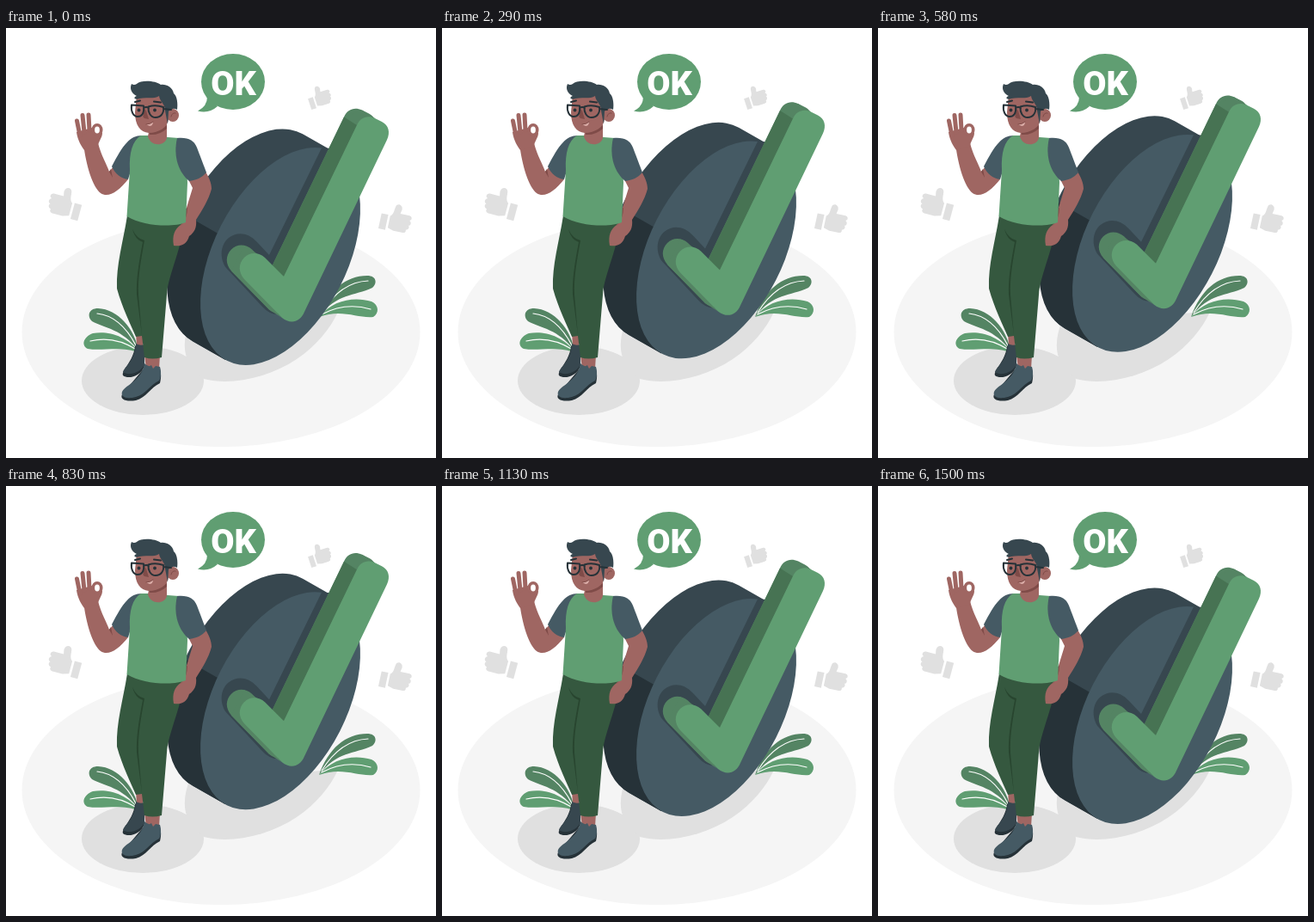
An HTML page for the animation above (1.54 s loop, 500 by 500 pixels).

```html
<!DOCTYPE html>
<html lang="en">
<head>
<meta charset="utf-8">
<style>
  html, body { margin: 0; width: 100%; height: 100%; overflow: hidden; background: #fff; }
  svg { display: block; width: 100vw; height: 100vh; }
  .green { fill: #609e72; }
  .leaf { fill: #548463; }
  .forest { fill: #477353; }
  .slate { fill: #455a64; }
  .dark { fill: #37474f; }
  .ink { fill: #263238; }
  .skin { fill: #9f6662; }
  .shade { fill: #7f4b48; }
  .pants { fill: #35583f; }
  .grey { fill: #e0e0e0; }
  .line { fill: none; stroke-linecap: round; stroke-linejoin: round; }
</style>
</head>
<body>
<svg viewBox="0 0 500 500">
  <defs>
    <g id="thumb" class="grey">
      <path d="M-17.5-4H-9.500V14H-17.500Z"/>
      <path d="M-7-3C-3-6-4-11-3-15C-2-20 5-19 5-13L4-8H14C19-8 19-3 16-2.500C19-1 19 3 16 3.500C18 5 17 8.500 14 9C15 12 13 13 10 13H0L-7 11Z"/>
    </g>
    <path id="check" d="M323 289L408 113C412 104 420 101 429 105L437 109C445 113 447 121 443 130L347 330C342 342 331 345 321 337L277 292C270 284 270 274 277 267C284 260 294 261 301 267Z"/>
  </defs>

  <ellipse cx="250" cy="353.500" rx="231.500" ry="133.500" fill="#f5f5f5"/>
  <ellipse class="grey" cx="159" cy="410" rx="71" ry="40"/>
  <path class="grey" d="M214 340C204 366 204 390 230 408C262 416 305 407 338 385C360 370 377 350 386 330Z"/>
  <use href="#thumb" transform="translate(69 205) rotate(15) scale(-1.07 1.07)"/>
  <use href="#thumb" transform="translate(453 223) rotate(12)"/>
  <use href="#thumb" transform="translate(364.500 81) rotate(-18) scale(.75)"/>

  <g id="bubble">
    <ellipse class="green" cx="264" cy="62.500" rx="37" ry="32.500"/>
    <path class="green" d="M234 80Q234 91 223 96.500Q236 100 246 91Z"/>
    <text x="264.500" y="77.500" text-anchor="middle" fill="#fff" font-family="Roboto, sans-serif" font-weight="900" font-size="39.500">OK</text>
  </g>

  <g id="plants">
    <path class="leaf" d="M154 375C150 350 130 327 107 326C96 326 94 335 100 341C115 349 135 350 154 375Z"/>
    <path class="green" d="M156 378C140 357 118 352 101 355C90 359 87 369 95 373C112 376 135 369 156 378Z"/>
    <path class="leaf" d="M364 336C375 305 395 288 420 288C431 288 432 297 426 302C405 312 385 308 364 336Z"/>
    <path class="green" d="M364 336C380 316 405 312 425 318C434 322 434 332 427 336C410 338 390 326 364 336Z"/>
    <path class="line" stroke="#fff" stroke-width="1.200" d="M106 332C126 334 141 350 151 369M98 364C118 359 136 364 152 374M421 294C398 295 380 310 367 331M424 327C404 321 384 324 367 333"/>
  </g>

  <g id="disc">
    <path class="dark" d="M382.800 144.900L345 123.400A77.700 136.400 27.100 0 0 217.400 364.600L255.200 386.100Z"/>
    <path class="ink" d="M250 241L207 216.500A77.700 136.400 27.100 0 0 217.400 364.600L255.200 386.100Z"/>
    <ellipse class="slate" cx="319" cy="265.500" rx="77.700" ry="136.400" transform="rotate(27.100 319 265.500)"/>
    <path class="dark" d="M367 139.500L306 264L292 249C281 237 268 237 259 244C249 252 248 268 256 279L298 324Q306 333 316 333L330 300L378 140Z"/>
    <use href="#check" class="leaf" x="-15" y="-9.500"/>
    <path class="leaf" d="M414 95.500L429 105L408 113L393 103.500ZM277 253L292 262.500L277 292L262 282.500ZM262 282.500L277 292L321 337L306 327.500Z"/>
    <path class="forest" d="M308 279.500L393 103.500L408 113L323 289Z"/>
    <use href="#check" class="green"/>
  </g>

  <g id="man">
    <!-- legs and shoes -->
    <path class="skin" d="M151 355L159 356V371L152 370ZM161 380L179 380L178 397L163 396Z"/>
    <path class="ink" d="M150 370L161 370V393C157 405 142 409 136 404C134 398 148 388 150 370Z"/>
    <path class="dark" d="M151 367Q156 370 161 368V391C157 401 142 405 136 400C138 393 150 388 151 367Z"/>
    <path class="ink" d="M161 395L179 397C181 403 180 409 179 413C168 418 163 430 151 433C140 435 132 432 135 426Z"/>
    <path class="slate" d="M161 390Q166 395 169 392L171 396L174 393L179 394C181 401 180 407 178 410C167 415 163 426 151 429C140 432 133 429 135 423C140 414 158 410 161 390Z"/>
    <path class="pants" d="M141 218C136 250 128 275 129 303C135 325 145 345 151 359L158 358L161 383Q170 386 181 383L187 310C188 290 202 262 208 226Z"/>
    <path fill="#28452f" d="M147 234Q152 245 161 247C157 270 153 290 154 310L158 357L152 310C151 290 156 265 159 249Q150 246 147 234Z"/>

    <!-- arms -->
    <path class="skin" d="M90 134C93 160 101 185 110 192C119 198 131 190 142 176L125 161L120 167C117 158 111 149 107 134Z"/>
    <path class="shade" d="M122 164L120 167L124 174Z"/>
    <path class="skin" d="M82 121C83 130 88 138 91 142L107 138C107 132 112 128 112 122L100 116Z"/>
    <path class="line" stroke="#9f6662" stroke-width="5" d="M86 125L82.500 108M91 121L89 101.500M97 119L96 101"/>
    <ellipse cx="106" cy="118.500" rx="4.700" ry="5.700" fill="#fff" stroke="#9f6662" stroke-width="3.600"/>
    <path class="skin" d="M212 176L232 167C236 174 239 180 239 187C236 199 228 212 221 223C222 232 219 238 213 242C210 253 202 254 195 253C193 241 196 234 203 229C208 224 207 218 209 212L217 186Z"/>
    <path class="shade" d="M209 210L211 209Q211 222 203 230Q208 222 209 210Z"/>

    <!-- shirt -->
    <path class="slate" d="M158 125C144 125 136 136 123 161C127 170 134 175 142 176L150 150Z"/>
    <path class="green" d="M157 125L167 125L188 127L201 128C207 145 211 165 211 180L209 226C195 232 160 231 140.500 219L144 165C143 145 147 131 157 125Z"/>
    <path class="slate" d="M199 128C212 127 218 130 222 139L233 168C228 174 221 177 213 178C201 168 194 150 199 128Z"/>
    <path class="skin" d="M167 115L187 110L187 128C184 138 168 138 165 126Z"/>
    <path class="shade" d="M167 120Q179 121 187 113V117Q178 125 167 124Z"/>

    <!-- head -->
    <path class="skin" d="M152 78L150 98C150 113 156 121 166 122C178 122 188 115 189 106L196 90V78Z"/>
    <ellipse class="skin" cx="194" cy="101.500" rx="7" ry="7.500"/>
    <path class="dark" d="M146 65C143 71 147 77 152 79C147 81 150 84 155 82C163 80 172 83 178 79C179 86 185 88 185 96L188 112L189 97C192 93 196 93 199 95C200 88 199 79 195 76C194 69 186 65 180 66C174 61 157 60 152 65Q149 67 146 65Z"/>
    <path class="shade" d="M161 94C160 101 158 103 161 105L166 106L163 96Z"/>
    <path class="line" stroke="#263238" stroke-width="2" d="M150 86L156 84.500M172 85.500L180 86.500"/>
    <g class="line" stroke="#263238" stroke-width="2">
      <path d="M146 89.500L160 90.500C161 99 158 103 153 103C148 103 145 97 146 89.500ZM165.500 91.500Q174 89 183 92C184 99 180 104 174 104C168 104 165 98 165.500 91.500ZM160 93Q163 91 166 93M183 94L192 95"/>
    </g>
    <circle class="ink" cx="154.500" cy="95.500" r="1.900"/>
    <circle class="ink" cx="173" cy="95.500" r="1.900"/>
    <path d="M163 112Q168 112 171 109Q171 114 167 114Z" fill="#d9aaa5"/>
    <path class="line shade" stroke="#7f4b48" d="M163 112Q168 112 171 109"/>
    <path class="line" stroke="#7f4b48" d="M192 103Q193 98 197 99"/>
  </g>
</svg>
<script>
  const LOOP = 1540, PEAK = 718, TOP = -18.700, TRAVEL = 20;
  const disc = document.getElementById('disc');

  // The disc rises and falls at constant speed.
  function draw(now) {
    const gap = Math.abs(now % LOOP - PEAK);
    const y = TOP + TRAVEL * Math.min(gap, LOOP - gap) / (LOOP / 2);
    disc.setAttribute('transform', `translate(0 ${y.toFixed(2)})`);
  }
  function tick() {
    draw(performance.now());
    requestAnimationFrame(tick);
  }
  tick();
</script>
</body>
</html>
```
